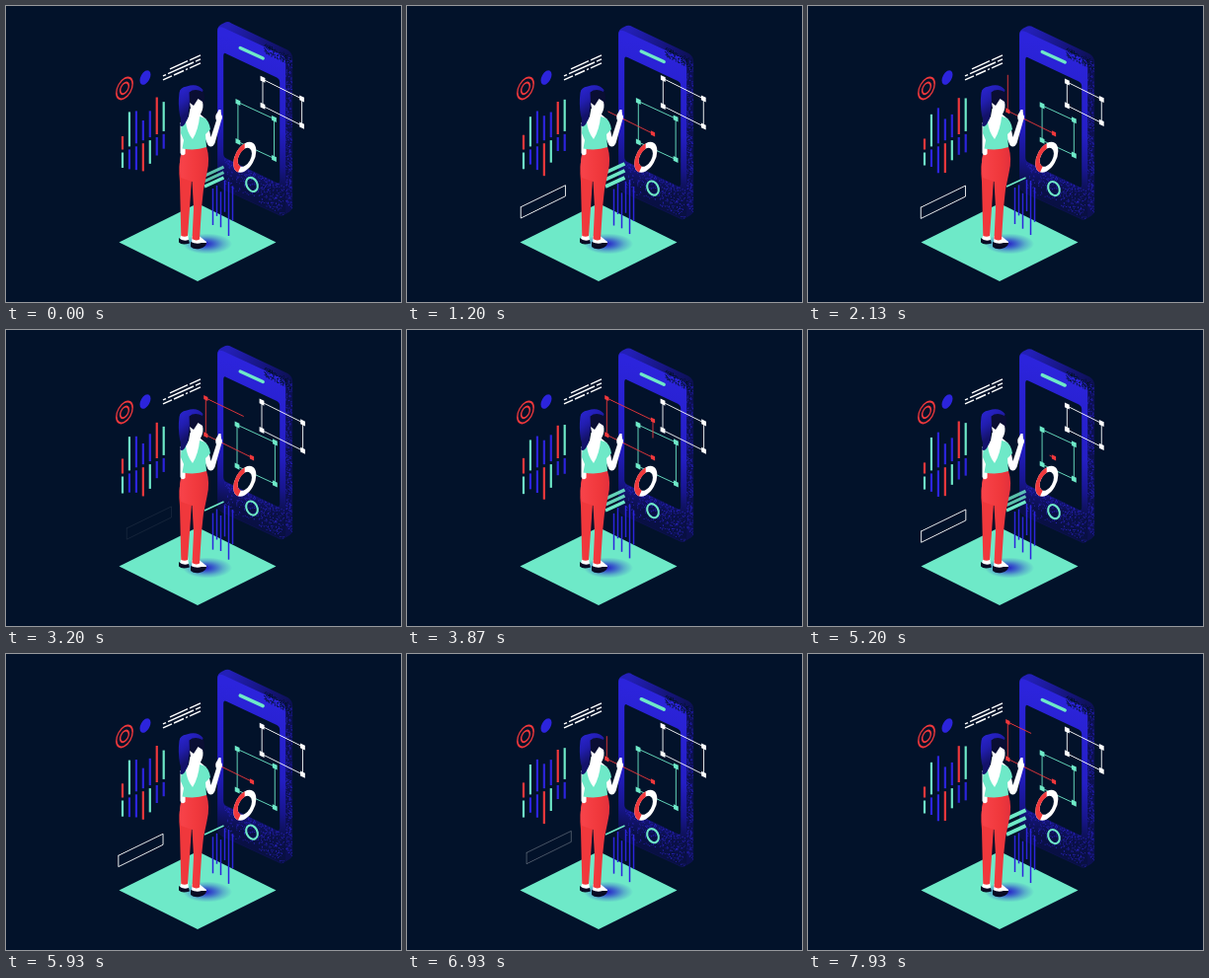
Recreate the animation shown at these times as an HTML page with a canvas. Size 400 px wide and 300 px high, loop 8 s.

```html
<!DOCTYPE html>
<html lang="en">
<head>
<meta charset="utf-8">
<title>Isometric interface</title>
<style>
  html, body { margin: 0; width: 100%; height: 100%; overflow: hidden; background: #02122a; }
  canvas { display: block; width: 100vw; height: 100vh; }
</style>
</head>
<body>
<canvas id="stage" width="400" height="300"></canvas>
<script>
const ctx = document.getElementById('stage').getContext('2d');
const LOOP = 8000, TAU = Math.PI * 2;
const NAVY = '#02122a', BLUE = '#2c24dc', RED = '#f0383c', MINT = '#6ee9c8', WHITE = '#fff';

const clamp = v => Math.max(0, Math.min(1, v));
const smooth = v => { v = clamp(v); return v * v * (3 - 2 * v); };
// Cosine wave that peaks at the given time.
const wave = (t, period, peak) => Math.cos(TAU * (t - peak) / period);

let seed = 7;
const random = () => (seed = seed * 16807 % 2147483647) / 2147483647;

// Speckles in a slanted panel; bias above 1 gathers them at the top.
function grain(count, x0, x1, top, height, bias) {
  const path = new Path2D();
  for (let i = 0; i < count; i++) {
    const x = x0 + random() * (x1 - x0);
    path.rect(x, top + (x - x0) * .47 + height * random() ** bias, .9, .9);
  }
  return path;
}
const bezelGrain = grain(330, 222, 282, 154, 29, 1.5);
const sideGrain = grain(330, 284, 290, 50, 152, 1);
const rimGrain = grain(160, 262, 289, 37, 10, 1);

function fill(path, color) {
  ctx.fillStyle = color;
  ctx.fill(typeof path === 'string' ? new Path2D(path) : path);
}

function line(points, color, width, cap = 'butt') {
  ctx.beginPath();
  points.forEach(([x, y]) => ctx.lineTo(x, y));
  ctx.strokeStyle = color;
  ctx.lineWidth = width;
  ctx.lineCap = cap;
  ctx.stroke();
}

// Circle lying in the wall that rises to the right; no width means a disc.
function wallCircle(x, y, r, color, width, from = 0, to = TAU) {
  ctx.save();
  ctx.transform(.82, -.45, 0, 1, x, y);
  ctx.beginPath();
  ctx.arc(0, 0, r, from, to);
  ctx.lineWidth = width;
  ctx.lineCap = 'butt';
  ctx.strokeStyle = ctx.fillStyle = color;
  width ? ctx.stroke() : ctx.fill();
  ctx.restore();
}

function gradient(x0, y0, x1, y1, ...stops) {
  const g = ctx.createLinearGradient(x0, y0, x1, y1);
  stops.forEach(([at, color]) => g.addColorStop(at, color));
  return g;
}

function handle([x, y], color, size = 4.8) {
  ctx.save();
  ctx.transform(1, .47, 0, 1, x, y);
  ctx.fillStyle = color;
  ctx.fillRect(-size / 2, -size / 2, size, size);
  ctx.restore();
}

function platform() {
  fill('M114.500 239.500L194 200L273.500 239.500L194 279Z', MINT);
  ctx.save();
  ctx.translate(204, 241);
  ctx.scale(1, .42);
  const g = ctx.createRadialGradient(-3, 0, 2, 0, 0, 25);
  g.addColorStop(0, '#2722c8');
  g.addColorStop(.3, '#2b35cbc0');
  g.addColorStop(.65, '#2b35cb50');
  g.addColorStop(1, '#2b35cb00');
  ctx.fillStyle = g;
  ctx.fillRect(-26, -26, 52, 52);
  ctx.restore();
}

function phone(t) {
  ctx.save();
  ctx.translate(-.8, 2.8 - 2.8 * wave(t, 2900, 260));
  fill('M215 24Q215 20 219 18L223 16Q226 15 229 17L286 44Q291 47 291 53V203Q291 206 288 208L281 212Q279 213 276 211L220 185Q215 182 215 178Z',
    gradient(225, 20, 285, 60, [0, '#231fb8'], [.6, '#15147a'], [1, '#0c1050']));
  fill('M215 25Q215 19 221 21.500L278 48Q284 51 284 57V206Q284 213 278 211L221 185Q215 182 215 177Z',
    gradient(255, 35, 225, 205, [0, BLUE], [.5, '#241ec4'], [.7, '#17158c'], [.84, '#0a1048'], [1, '#081040']));
  fill(bezelGrain, '#2620b4');
  fill(sideGrain, '#231eae');
  fill(rimGrain, NAVY);
  fill('M221 50Q221 46 224 48L275 72Q278 73.500 278 77V176Q278 180 275 178.500L224 154Q221 152.500 221 149Z', NAVY);
  line([[238, 42], [261, 52.5]], MINT, 3.4, 'round');
  ctx.beginPath();
  ctx.ellipse(249.8, 180.5, 5.4, 7.4, -.46, 0, TAU);
  ctx.strokeStyle = MINT;
  ctx.lineWidth = 2.1;
  ctx.stroke();
  ctx.restore();
}

function frame(cx, cy, halfW, halfH, skew, scale, color) {
  const corners = [[-1, -1], [1, -1], [1, 1], [-1, 1]].map(([sx, sy]) =>
    [cx + sx * halfW * scale, cy + (sy * halfH + sx * skew) * scale]);
  line([...corners, corners[0]], color, .9);
  corners.forEach(p => handle(p, color));
}

function redFrame(t) {
  const cycle = (t + 50) % 5130;
  const corners = [[249, 129.3], [202.3, 106.3], [202.3, 69], [249, 91.5], [249, 129.3]];
  let left = cycle * .0406;
  if (left < 3) return;
  ctx.globalAlpha = 1 - smooth((cycle - 4450) / 400);
  const points = [corners[0]];
  handle(corners[0], RED, 4.2);
  for (let i = 1; i < corners.length && left > 0; i++) {
    const [a, b] = [corners[i - 1], corners[i]];
    const dx = b[0] - a[0], dy = b[1] - a[1], length = Math.hypot(dx, dy);
    const part = Math.min(1, left / length);
    points.push([a[0] + dx * part, a[1] + dy * part]);
    if (part === 1) handle(b, RED, 4.2);
    left -= length;
  }
  line(points, RED, .9);
  ctx.globalAlpha = 1;
}

function bars(t) {
  const upper = [RED, MINT, BLUE, BLUE, BLUE, RED, MINT];
  const lower = [MINT, BLUE, BLUE, RED, MINT, BLUE, BLUE];
  const heights = [15, 34, 35, 24, 27, 37, 33];
  const drops = [17, 19, 26, 32, 24, 18, 18];
  upper.forEach((color, i) => {
    const x = 118 + i * 6.95, base = 147 - i * 3.1;
    const sway = 2.5 * Math.sin(TAU * t / 2900 + i * 1.7);
    line([[x, base - 1.5], [x, base - heights[i] - sway]], color, 2.2);
    line([[x, base + 1.5], [x, base + drops[i] + sway]], lower[i], 2.2);
  });
}

function caption() {
  const dash = (x0, x1, shift) =>
    line([[x0, 138.5 + shift - x0 * .45], [x1, 138.5 + shift - x1 * .45]], WHITE, 1.4);
  [[166, 184, 0], [186, 197, 0], [159, 162, 4], [164, 190, 4], [192, 197, 4],
   [159, 168, 8], [170, 180, 8], [182, 184, 8], [186, 197, 8]].forEach(d => dash(...d));
}

function outlineBox(t) {
  const w = wave(t, 3900, 1750);
  const offset = 5.3 * (1 - w);
  ctx.globalAlpha = smooth((w + .9) / 1.15);
  ctx.save();
  ctx.translate(offset, -offset * .4);
  line([[113.3, 204.5], [158.5, 182.5], [158.5, 193.5], [113.3, 215.8], [113.3, 204]], WHITE, .9);
  ctx.restore();
  ctx.globalAlpha = 1;
}

function stripes(t) {
  const spread = clamp((wave(t, 3800, 700) + .5) / 1.5);
  for (let i = 0; i < 3; i++) {
    const y = 183 - i * 9 * spread;
    ctx.globalAlpha = i ? smooth(spread * 1.2) : 1;
    line([[201, y], [220.5, y - 9]], MINT, 1.6 + 2.6 * spread);
  }
  ctx.globalAlpha = 1;
}

function rain(t) {
  const tops = [184, 180, 188, 176, 176, 182];
  const ends = [221, 211, 224, 208, 231, 217];
  tops.forEach((top, i) => {
    const sway = Math.sin(TAU * t / 2900 + i * 2);
    const x = 209.5 + i * 4;
    line([[x, top + 1 + sway], [x, ends[i] + 1 + sway]], BLUE, 1.5);
  });
}

function donut() {
  wallCircle(241.8, 153.3, 11.4, WHITE, 5.4);
  wallCircle(241.8, 153.3, 11.4, RED, 5.4, 2.2, 4.7);
}

function woman() {
  // Shoes and ankles
  fill('M178 229L184 229L185 239Q178 241 176 237Z', WHITE);
  fill('M188.500 233L195.500 233L203 239Q203 242 199 243L188 243Z', WHITE);
  fill('M175 235Q179 239 185 237L186 240.500Q178 243 175 239.500Z', '#090b24');
  fill('M187 239Q193 242 198 240L203 240Q203 244 196 246Q190 247 187 244Z', '#090b24');
  // Trousers: far leg, then hips with near leg
  fill('M178 148Q174 162 176 178L177.300 233Q181 234.500 184 233L186 205L188 176L190 160Z', RED);
  fill('M178.500 144L203 142.500Q207 155 203.500 169L200 186L198 205L196 236.500Q192 238.500 188.500 236L190 205L188.500 178L177 174Q174 160 178.500 144Z',
    gradient(176, 0, 206, 0, [0, '#f8434a'], [.6, RED], [1, '#e2303c']));
  // Arms
  fill('M176.500 118L182 122L181.500 150Q178 153 176.500 149Z', WHITE);
  fill('M200 117Q205 119 206 126L207.500 133L213 116Q211 111 214 108L215.500 105L217.500 105L218 110Q220 112 218 116L211.500 139Q208.500 145 204.500 141L199 128Z', WHITE);
  // Neck and back
  fill('M187 101L198 104L197 110L203 115L194 124L180 121L185 112Z', WHITE);
  // Top with open back
  fill('M177.500 120L183 115L189 131L196 112L201 113.500Q206 117 207 125L202 130L203 143Q192 147 178.500 144.500L180 136L177 129Z', MINT);
  fill('M182 117L196 112Q195 125 189 135Q183 128 182 117Z', WHITE);
  // Hair: dark mass, face, lit rim and ponytail
  fill('M176 88Q178 82 184 81.500Q194 78 199.500 85Q202 91 200 99L194 101L187 104L178 100Z', '#0a0e33');
  fill('M186 98L190 101L194.500 94L199 97Q200.500 103 197.500 108.500Q194 111 188 109Z', WHITE);
  fill('M175.500 88Q176 82.500 183 81.500Q194 78 199.500 85L199 87Q191 83 185.500 87.500Q186.500 97 185 105Q185 113 182 118Q179 124 176 121Q178 116 176 111Q174 99 175.500 88Z',
    gradient(175, 84, 190, 104, [0, '#2a24d0'], [.5, '#211dae'], [1, '#13126a']));
}

function draw(t) {
  ctx.fillStyle = NAVY;
  ctx.fillRect(0, 0, 400, 300);
  platform();
  phone(t);

  const pulse = smooth(.5 + .85 * wave(t, 2900, 650));
  const scale = .84 + .16 * pulse;
  frame(253.2, 126, 19.2, 21, 8.9, scale, MINT);
  frame(279.8, 97.7, 20.8, 14.2, 10.4, scale, WHITE);

  wallCircle(120, 83.4, 10, RED, 1.8);
  wallCircle(120, 83.4, 5.3, RED, 1.8);
  wallCircle(141, 72.5, 6.7, BLUE, 0);
  caption();
  bars(t);
  outlineBox(t);
  stripes(t);
  rain(t);
  donut();
  redFrame(t);
  woman();
}

function tick() {
  draw(performance.now() % LOOP);
  requestAnimationFrame(tick);
}
tick();
</script>
</body>
</html>
```
